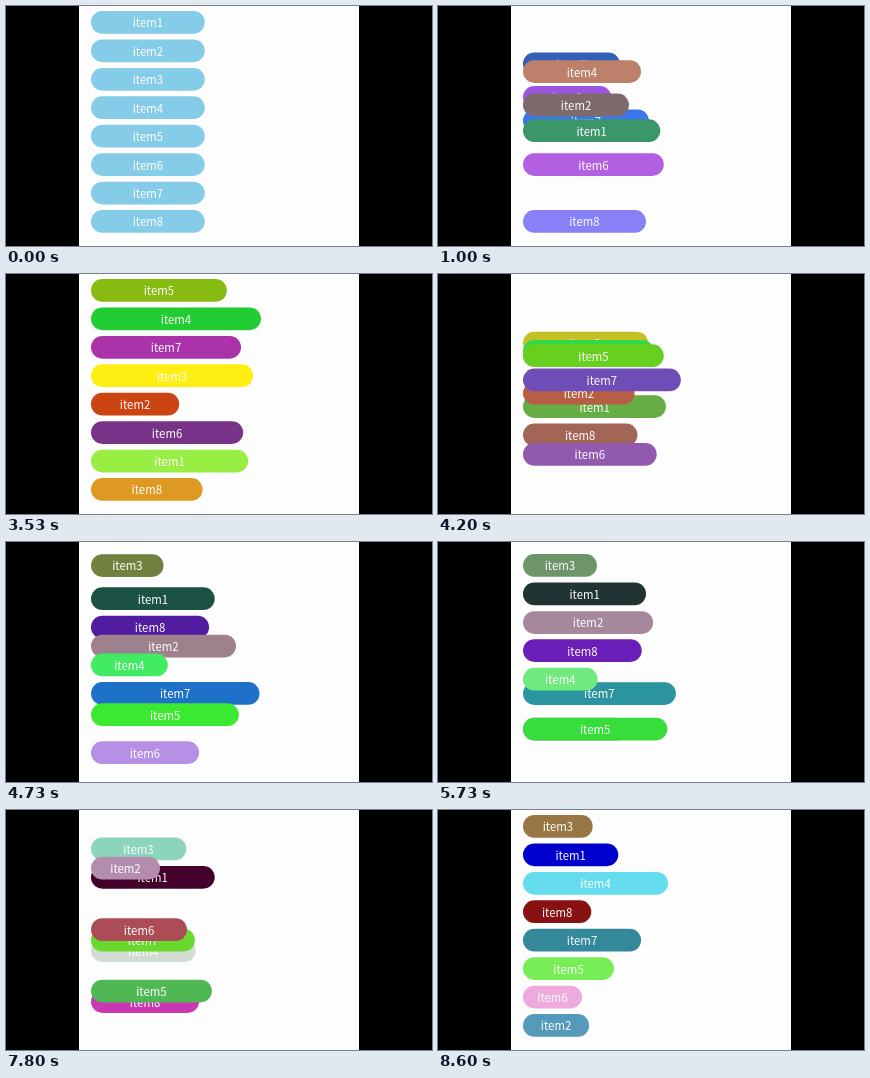
An HTML page that plays this animation: 426x240 px, repeating every 8670 ms.

```html
<!DOCTYPE html>
<html lang="en">
<head>
<meta charset="utf-8">
<title>Shuffling list</title>
<style>
  html, body { margin: 0; width: 100%; height: 100%; overflow: hidden; background: #000; }
  #page {
    position: absolute; left: 73px; top: 0; width: 280px; height: 240px;
    background: #fdfdfd; overflow: hidden;
  }
  #list { position: absolute; left: 12.1px; top: 5px; transform: scale(.711); transform-origin: 0 0; }
  .item {
    position: absolute; height: 32px; border-radius: 16px; color: #fff; text-align: center;
    font: 16px/33px "Noto Sans CJK SC", "Noto Sans CJK JP", "Noto Sans CJK", "Noto Sans", sans-serif;
  }
</style>
</head>
<body>
<div id="page"><div id="list"></div></div>
<script>
const LOOP = 8670, MOVE = 1000, FPS = 15, COUNT = 8, ROW = 40;

// A pose lists its rows from the top, each as "item width colour".
function pose(start, rows) {
  const at = [];
  rows.split(', ').forEach((row, slot) => {
    const [id, width, hex] = row.split(' ');
    at[id - 1] = { slot, width: +width, rgb: [...hex].map(d => parseInt(d, 16) * 17) };
  });
  return { start, at };
}

const plain = {
  start: -MOVE,
  at: Array.from({ length: COUNT }, (_, slot) => ({ slot, width: 160, rgb: [133, 204, 232] }))
};

const poses = [
  plain,
  pose(365, '5 122 029, 4 169 d52, 7 187 14e, 3 103 a1d, 2 143 732, 6 220 c2d, 1 212 172, 8 180 85f'),
  pose(2335, '5 191 8b1, 4 239 2c3, 7 211 a3a, 3 228 fe1, 2 124 c41, 6 214 738, 1 221 9e4, 8 157 d92'),
  pose(3817, '3 91 674, 1 170 144, 8 167 41a, 2 211 989, 4 96 4e6, 7 239 17c, 5 210 3e3, 6 146 b9e'),
  pose(5485, '2 98 c8a, 3 143 8ed, 1 184 500, 6 149 933, 7 141 7e1, 4 132 edc, 5 181 4a5, 8 167 d4d'),
  pose(7590, '3 98 974, 1 134 00c, 4 204 6de, 8 96 811, 7 166 389, 5 128 7e5, 6 83 ead, 2 93 59b')
];

const list = document.getElementById('list');
const items = plain.at.map((_, i) => {
  const el = document.createElement('div');
  el.className = 'item';
  el.textContent = 'item' + (i + 1);
  return list.appendChild(el);
});

const mix = (a, b, p) => a + (b - a) * p;

function draw(ms) {
  const t = Math.floor(ms % LOOP * FPS / 1000 + 0.1) * 1000 / FPS;
  const n = poses.findLastIndex(s => s.start <= t);
  const to = poses[n], from = poses[Math.max(0, n - 1)];
  const p = Math.min(1, (t - to.start) / MOVE);
  items.forEach((el, i) => {
    const a = from.at[i], b = to.at[i];
    el.style.width = mix(a.width, b.width, p) + 'px';
    el.style.transform = `translateY(${mix(a.slot, b.slot, p) * ROW}px)`;
    el.style.background = `rgb(${b.rgb.map((c, k) => Math.round(mix(a.rgb[k], c, p)))})`;
    el.style.zIndex = b.slot;
  });
}

const begin = performance.now();
function tick() {
  draw(performance.now() - begin);
  requestAnimationFrame(tick);
}
tick();
</script>
</body>
</html>
```
